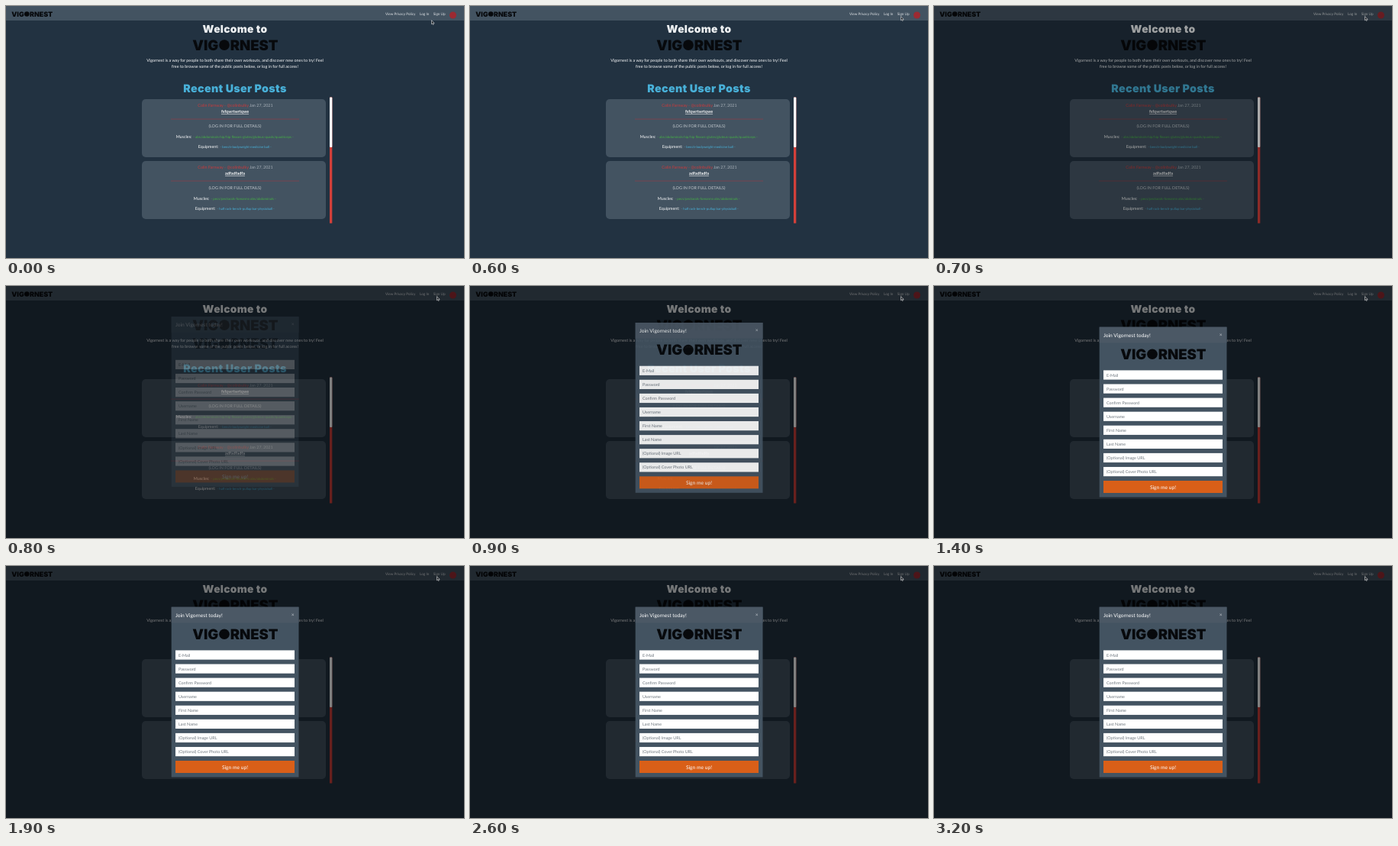
Write an HTML page that moves like this. It is 600 px wide and 330 px high and loops after 3.3 s.

```html
<!DOCTYPE html>
<html lang="en">
<head>
<meta charset="utf-8">
<title>Vigornest</title>
<style>
  html, body { margin: 0; height: 100%; overflow: hidden; background: #223241; }
  svg { display: block; width: 100vw; height: 100vh; }
  text { font: 5.4px Lato, sans-serif; fill: #fff; text-rendering: geometricPrecision; white-space: pre; }
  .mid { text-anchor: middle; }
  .nav { font-size: 4.65px; fill: #e2e5e8; }
  .head, .mark text { font-family: Inter, sans-serif; font-weight: 900; }
  .head { letter-spacing: .3px; }
  .mark text { font-size: 1px; fill: #07090c; }
  .mark circle { fill: #07090c; }
  .user { fill: #cc393b; }
  .dim { fill: #a9b1b9; }
  .title { font-weight: 700; text-decoration: underline .4px; }
  .tags { font-size: 4.3px; }
  .green { font-size: 4.45px; fill: #45b045; }
  .blue { fill: #48b0d8; }
  .hint { fill: #6c757d; }
  .big { font-size: 6.7px; }
</style>
</head>
<body>
<svg viewBox="0 0 600 330" preserveAspectRatio="none">
  <rect width="600" height="330" fill="#223241"/>
  <rect width="600" height="19" fill="#435361"/>
  <g id="page">
    <text class="nav" x="497" y="11.6">View Privacy Policy</text>
    <text class="nav" x="542" y="11.6">Log In</text>
    <text class="nav" x="559.8" y="11.6">Sign Up</text>
    <circle cx="585.5" cy="12" r="4.5" fill="#9c2a32"/>
    <text class="head mid" x="300" y="35.4" style="font-size:13.8px;fill:#eceff1">Welcome to</text>
    <text class="mid" x="300" y="73">Vigornest is a way for people to both share their own workouts, and discover new ones to try! Feel</text>
    <text class="mid" x="300" y="81">free to browse some of the public posts below, or log in for full access!</text>
    <text class="head mid blue" x="300" y="112.8" style="font-size:14.3px">Recent User Posts</text>
    <rect x="424" y="119.5" width="3.3" height="165" fill="#d2403a"/>
    <rect x="424" y="119.5" width="3.3" height="65.5" rx="1" fill="#fff"/>
  </g>
  <rect id="shade" width="600" height="330"/>
  <g id="modal">
    <rect x="216.7" y="53.7" width="166.8" height="222.8" fill="#435361"/>
    <rect x="216.7" y="53.7" width="166.8" height="20.8" fill="#4b5865"/>
    <text class="big" x="222" y="66.6">Join Vigornest today!</text>
    <text class="big mid" x="375.8" y="65.6" style="fill:#bcc3c9">×</text>
    <rect x="222" y="255" width="156" height="16" fill="#d95f18"/>
    <text class="big mid" x="300" y="265.5">Sign me up!</text>
  </g>
  <path id="cursor" d="M0 0V5.1L1.2 4.1 2 5.8 2.8 5.4 2.1 3.7H3.6Z" fill="#16191d" stroke="#e6e8ea" stroke-width=".6"/>
</svg>
<script>
const el = id => document.getElementById(id);
const add = (id, markup) => el(id).insertAdjacentHTML('beforeend', markup);
const clamp = v => Math.min(1, Math.max(0, v));

const mark = (x, y, size) => `<g class="mark" transform="translate(${x} ${y}) scale(${size})">
  <text x="1.95" text-anchor="end">VIG</text><circle cx="2.35" cy="-.364" r=".37"/><text x="2.77">RNEST</text></g>`;

const tagLine = (y, label, tags, color) =>
  `<text class="mid" x="299.7" y="${y}">${label}:<tspan class="tags ${color}" dx="2">- ${tags} -</tspan></text>`;

const post = (y, title, muscles, gear) => `<g transform="translate(0 ${y})">
  <rect x="178" width="241" height="76" rx="5" fill="#435361"/>
  <text class="mid" x="300.5" y="10.3"><tspan class="user">Colin Farnway - @colinbulky</tspan><tspan class="dim"> Jan 27, 2021</tspan></text>
  <text class="mid title" x="300" y="18.4">${title}</text>
  <rect x="216" y="25.8" width="168" height=".5" fill="#a8363c"/>
  <text class="mid" x="300" y="37.2" style="fill:#c3c9ce">(LOG IN FOR FULL DETAILS)</text>
  ${tagLine(50.7, 'Muscles', muscles, 'green')}
  ${tagLine(64.3, 'Equipment', gear, 'blue')}</g>`;

add('page', mark(6.4, 13.8, 8.9) + mark(242.5, 57.8, 18.5)
  + post(122, 'fsfqwrtwrtqwe', 'abs/abdominals-hip/hip flexors-glutes/gluteus-quads/quadriceps', 'bench-bodyweight-medicine ball')
  + post(203, 'adfadfadfa', 'pecs/pectorals-forearms-abs/abdominals', 'half rack-bench-pullup bar-physioball'));

const fields = ['E-Mail', 'Password', 'Confirm Password', 'Username', 'First Name', 'Last Name',
  '(Optional) Image URL', '(Optional) Cover Photo URL'];
add('modal', mark(242.5, 96, 18.5) + fields.map((name, i) => {
  const y = 110.4 + i * 18.08;
  return `<rect x="222" y="${y}" width="156" height="12.2" fill="#fff"/><text class="hint" x="226" y="${y + 8.2}">${name}</text>`;
}).join(''));

const LOOP = 3300, STEP = 100;

function draw(now) {
  const t = Math.floor(now % LOOP / STEP) * STEP;
  const move = 1 - (1 - clamp(t / 600)) ** 2;
  el('cursor').setAttribute('transform', `translate(${557.5 + 7 * move} ${18.7 - 5 * move})`);
  el('shade').setAttribute('opacity', 0.5 * clamp((t - 600) / 150));
  const drop = -18.5 * (1 - clamp((t - 750) / 300)) ** 1.7;
  el('modal').setAttribute('transform', `translate(0 ${drop})`);
  el('modal').setAttribute('opacity', clamp((t - 765) / 150));
}

const start = performance.now();
function tick() {
  draw(performance.now() - start);
  requestAnimationFrame(tick);
}
tick();
</script>
</body>
</html>
```
